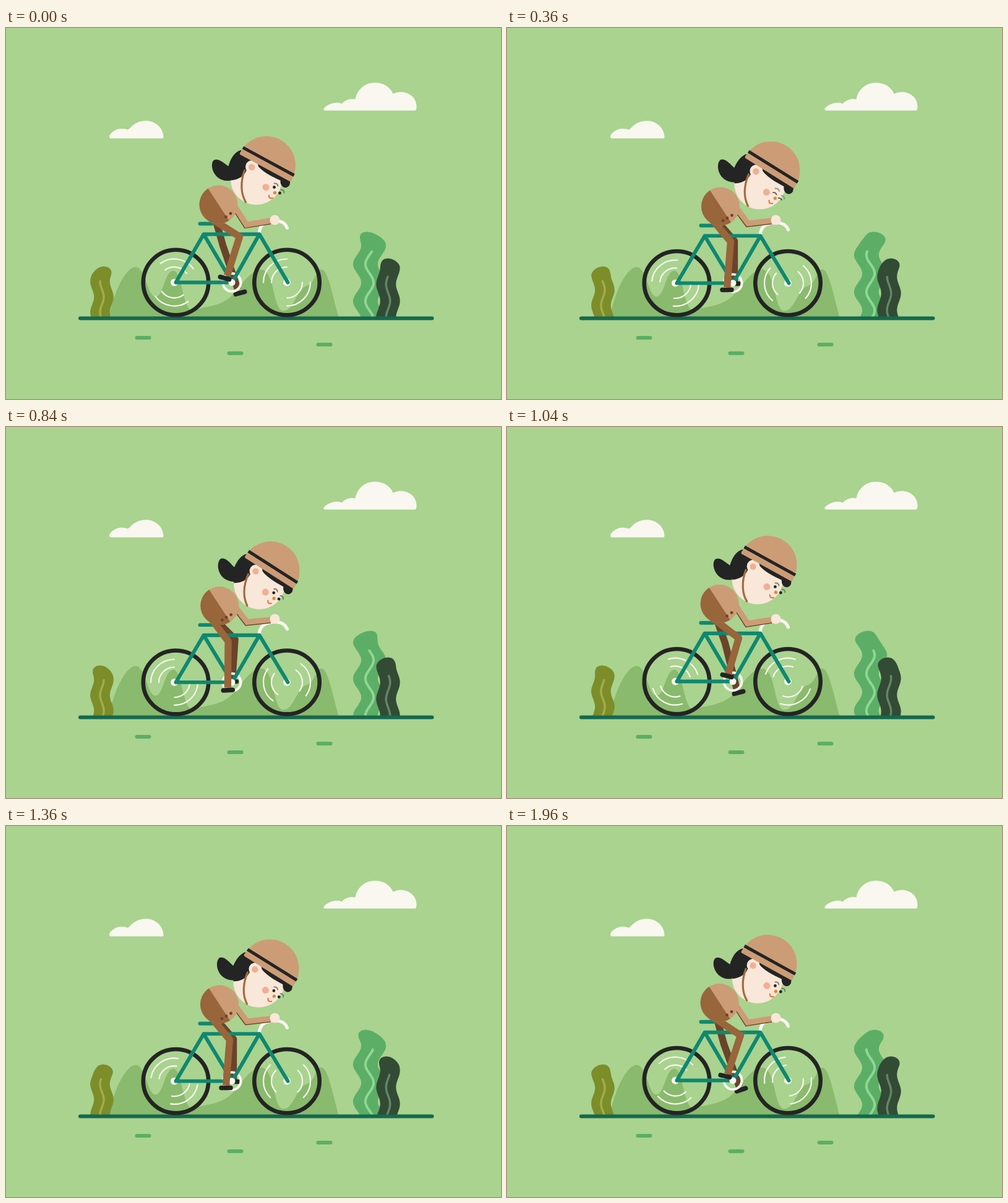
Recreate the animation shown at these times as an HTML page with a canvas. Size 800 px wide and 600 px high, loop 2 s.

```html
<!DOCTYPE html>
<html lang="en">
<head>
<meta charset="utf-8">
<title>Cyclist</title>
<style>
html, body { margin: 0; width: 100%; height: 100%; overflow: hidden; background: #a9d38f; }
canvas { display: block; }
</style>
</head>
<body>
<canvas id="stage" width="800" height="600"></canvas>
<script>
const ctx = document.getElementById('stage').getContext('2d');
const TAU = Math.PI * 2, RAD = Math.PI / 180;
const WHITE = '#f9f7f0', BLACK = '#242424', TEAL = '#0f8870', TAN = '#cc9c76',
  BROWN = '#99653b', DARK = '#6a432b', SKIN = '#f9e7d9', PINK = '#efb094', ORANGE = '#ee6a2c';

// Knee x/y, ankle x/y, shoe x/y and shoe tilt at each pedal phase
const PHASES = [0, .08, .28, .5, .72, .92];
const NEAR = [
  [377, 337, 357, 400, 353, 404, 15],
  [374, 341, 357, 399, 355, 402, 15],
  [360, 349, 376, 404, 380, 407, -15],
  [352, 350, 376, 424, 378, 428, -15],
  [361, 345, 355, 419, 355, 423, 0],
  [377, 338, 356, 401, 352, 404, 13]
];
const FAR = [
  [350, 351, 374, 422, 378, 428, -15],
  [352, 349, 371, 424, 374, 429, -15],
  [366, 343, 355, 417, 349, 422, 10],
  [377, 340, 357, 400, 353, 404, 15],
  [367, 344, 367, 410, 367, 413, 0],
  [350, 352, 375, 421, 378, 426, -18]
];

function fill(d, color) {
  ctx.fillStyle = color;
  ctx.fill(new Path2D(d));
}

function stroke(d, color, width, cap = 'round', join = 'round') {
  ctx.strokeStyle = color;
  ctx.lineWidth = width;
  ctx.lineCap = cap;
  ctx.lineJoin = join;
  ctx.stroke(new Path2D(d));
}

function dot(x, y, r, color) {
  ctx.fillStyle = color;
  ctx.beginPath();
  ctx.arc(x, y, r, 0, TAU);
  ctx.fill();
}

function ring(x, y, r, color, width, from = 0, to = 360) {
  ctx.strokeStyle = color;
  ctx.lineWidth = width;
  ctx.lineCap = 'round';
  ctx.beginPath();
  ctx.arc(x, y, r, from * RAD, to * RAD);
  ctx.stroke();
}

function group(draw, dx = 0, dy = 0, angle = 0, px = 0, py = 0) {
  ctx.save();
  ctx.translate(px + dx, py + dy);
  ctx.rotate(angle * RAD);
  ctx.translate(-px, -py);
  draw();
  ctx.restore();
}

// Smooth closed interpolation through unevenly spaced poses
function pose(rows, phase) {
  const n = PHASES.length;
  const at = i => PHASES[(i + n) % n] + Math.floor(i / n);
  const row = i => rows[(i + n) % n];
  let i = n - 1;
  while (PHASES[i] > phase) i--;
  const h = at(i + 1) - at(i), u = (phase - at(i)) / h;
  return row(i).map((a, k) => {
    const b = row(i + 1)[k];
    const m0 = (b - row(i - 1)[k]) / (at(i + 1) - at(i - 1)) * h;
    const m1 = (row(i + 2)[k] - a) / (at(i + 2) - at(i)) * h;
    return a + u * (m0 + u * (3 * (b - a) - 2 * m0 - m1 + u * (2 * (a - b) + m0 + m1)));
  });
}

function scenery() {
  fill('M169 178C165 177 166 173 170 169C178 161 190 161 196 164C201 163 205 150 226 149.5C243 150 254 163 254 176Q254 178 252 178Z', WHITE);
  fill('M515 133C511 132 513 129 517 126C525 120 537 119 542 122C548 115 558 113 564 115C567 98 580 88 596 88C611 88 621 96 625 106C640 98 663 106 663 127Q663 133 660 133Z', WHITE);
  fill('M166 467C175 420 195 386 209 386C225 386 228 434 241 434C254 434 256 392 270 392C284 392 284 450 300 457C318 449 345 452 365 432C380 415 395 391 411 390C435 390 430 457 448 457C464 457 470 421 485 417C500 412 500 390 509 390C520 390 528 435 537 467Z', '#8aba6d');
}

// A rounded column bent by a wave that travels upwards
function bush(t, b) {
  const sway = y => b.x + b.amp * Math.cos(TAU * ((t - b.peak) / b.period + (y - b.lineTop) / b.length));
  const left = [], right = [], line = [];
  for (let y = b.top; y <= 467; y++) {
    const k = Math.max(0, 1 - (y - b.top) / b.half);
    const w = b.half * Math.sqrt(1 - k * k);
    left.push([sway(y) - w, y]);
    right.unshift([sway(y) + w, y]);
    if (y >= b.lineTop) line.push([sway(y), y]);
  }
  fill('M' + left.concat(right).join('L') + 'Z', b.color);
  stroke('M' + line.join('L'), b.lineColor, b.lineWidth);
}

const BUSHES = [
  { x: 154.5, top: 385, half: 15.8, amp: 3, length: 50, period: 1600, peak: 813, lineTop: 409, color: '#7c8d2a', lineColor: '#a3ad48', lineWidth: 3.5 },
  { x: 587, top: 329, half: 20, amp: 6.6, length: 60, period: 1450, peak: 1215, lineTop: 361, color: '#5cae66', lineColor: '#8fd794', lineWidth: 4 },
  { x: 617, top: 372, half: 16, amp: 3.2, length: 54, period: 1600, peak: 1150, lineTop: 402, color: '#334a35', lineColor: '#64866a', lineWidth: 3.5 }
];

function ground() {
  stroke('M119.5 469H688', '#14694f', 6);
  stroke('M211 500.5H231M360 525.5H380M504 511.5H524', '#5cae66', 6);
}

function wheel(x, hub, angle) {
  for (const side of [0, 180])
    for (const r of [25, 38]) ring(hub, 411, r, WHITE, 2.2, angle + side - 45, angle + side + 45);
  ring(x, 411, 52.7, BLACK, 6.6);
  dot(hub, 411, 6, WHITE);
}

function leg(hip, [kx, ky, ax, ay, sx, sy, tilt], color) {
  stroke(`M${hip}L${kx} ${ky}L${ax} ${ay}`, color, 11.4, 'butt');
  group(() => stroke('M-7.5 0H7.5', BLACK, 7.5), sx, sy, tilt);
}

function bike(spin) {
  wheel(274, 271.5, 99 + spin);
  wheel(453.5, 453.5, 45 + spin);
  ring(364.5, 411, 14.5, WHITE, 4);
  stroke('M409 331C409 318 419 312 434 311C445 311 451 315 454 323', WHITE, 5);
  stroke('M313 316H333M274 411L319 333H409L455 411M274 411H365L319 333M409 333L365 411', TEAL, 6);
  dot(364.5, 411, 5.5, WHITE);
}

function eyes(closed) {
  if (closed) {
    stroke('M430 257Q434 256 436 260M439 265Q443 265 445 268', '#4a4a40', 1.6);
    stroke('M433 250Q438 249 440 254M444 261Q449 261 449 266', '#8b9178', 1.8);
  } else {
    dot(433, 257, 2.4, BLACK);
    dot(442, 266.5, 2.4, BLACK);
    stroke('M433 251Q438 250 439 255M444 261Q449 261 449 266', '#737a62', 1.8);
  }
}

function head(b, closed) {
  group(() => fill('M335 213.5C328 221 335 246 357 246.5C373 247 385 240 388 228L396 205L379 197C368 200 362 212 359 223C352 219 343 209 335 213.5Z', BLACK), b, 0, 5 * b, 385, 235);
  dot(404, 244, 41.5, SKIN);
  fill('M378 198C362 207 358 230 363 246C376 245 385 238 388 230L402 217C412 232 430 240 443 246C442 257 453 262 458 253L460 238Z', BLACK);
  dot(397, 224, 10.5, SKIN);
  dot(396.5, 224.5, 5.2, PINK);
  stroke('M385 230C378 249 379 268 387 281', '#a16c40', 3.2);
  group(() => {
    dot(419.5, 257, 5.5, PINK);
    eyes(closed);
    dot(434, 266, 2.7, '#f08432');
    stroke('M424.5 270Q424 276 430.5 274.5', ORANGE, 2);
  }, -4 * b, 0);
  group(() => {
    fill('M-45 1Q-48 1 -47 -4A47 47 0 0 1 47 -4Q48 1 45 1Z', TAN);
    stroke('M-47 -11H47', BLACK, 5, 'butt');
  }, 418.5, 225, 28.5);
}

function torso(b) {
  dot(343, 285, 31, TAN);
  fill('M326 259A31 31 0 0 0 360 311Z', BROWN);
  dot(346 + b, 308, b > .5 ? 2.3 : 0, DARK);
  dot(355 - b, 305 - b, 2.4, DARK);
  dot(362.5 - b, 299.5, 2.4, DARK);
}

function draw(t) {
  const phase = t % 500 / 500;
  const b = (1 - Math.cos(TAU * phase)) / 1.187;
  const arm = `M${366 + b} ${283 + 3 * b}L${388 + b} ${317.5 - 2 * b}L428 311`;
  const hip = [330 + b, 307 + 2 * b];

  ctx.fillStyle = '#a9d38f';
  ctx.fillRect(-1, -1, 802, 602);
  scenery();
  BUSHES.forEach(item => bush(t, item));
  ground();

  leg([339 + b, 312 + b], pose(FAR, phase), DARK);
  ctx.save();
  ctx.translate(0, 467);
  ctx.scale(1, 1 - .02 * b);
  ctx.translate(0, -467);
  bike(.364 * t);
  ctx.restore();

  leg(hip, pose(NEAR, phase), BROWN);
  group(() => stroke(arm, DARK, 8, 'butt', 'miter'), -1, 2);
  group(() => torso(b), 1.5 * b, 3 * b);
  stroke(arm, TAN, 9, 'butt', 'miter');
  dot(434, 310, 8, SKIN);
  group(() => head(b, t >= 320 && t <= 680), 4.2 * b, 7.3 * b, 3.5 * b, 403, 244);
}

ctx.translate(.5, .5);
function tick() {
  draw(Math.floor(performance.now() % 2000 / 40) * 40);
  requestAnimationFrame(tick);
}
tick();
</script>
</body>
</html>
```
